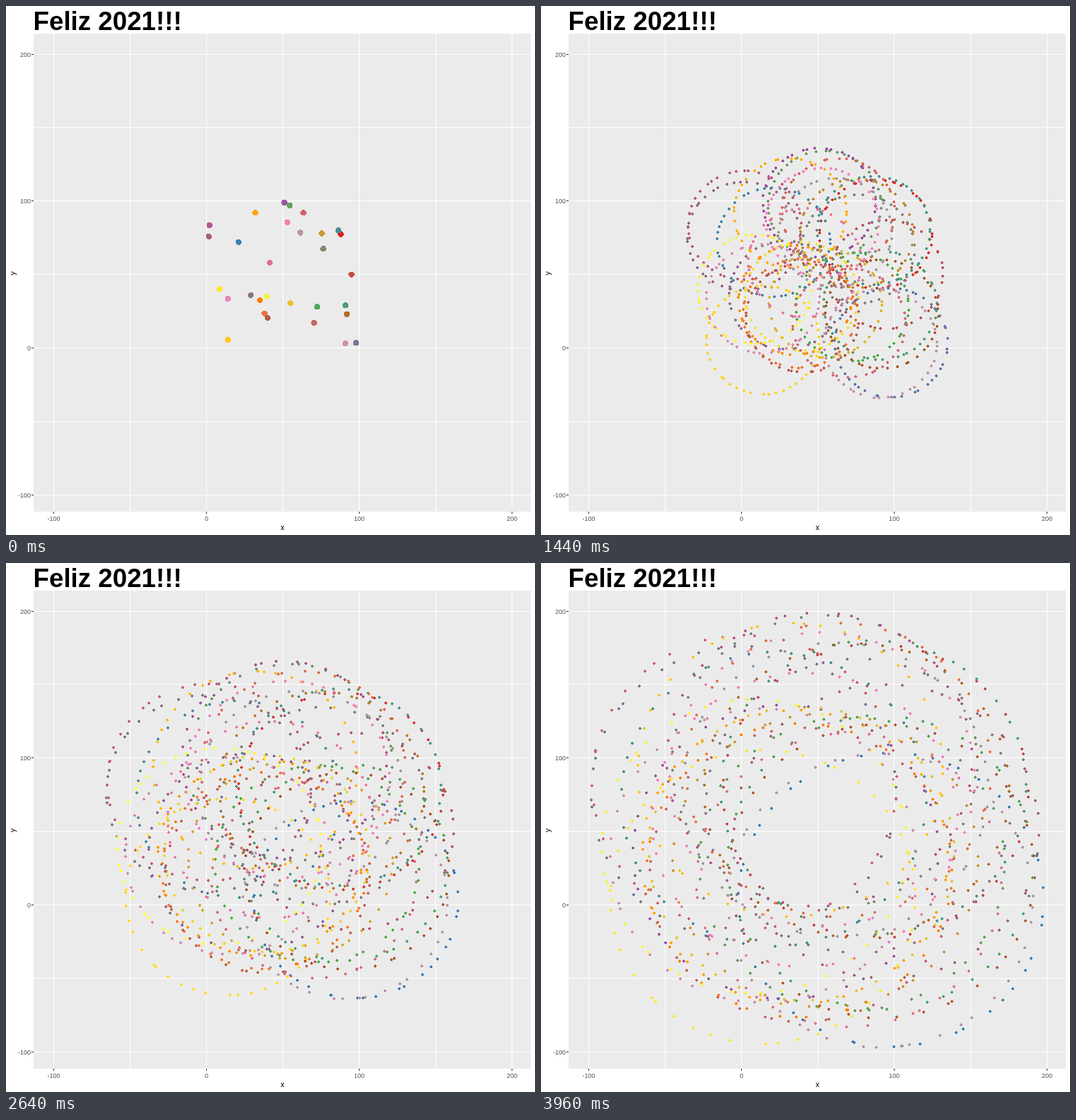
Recreate the animation shown at these times as an HTML page with a canvas. Size 748 by 748 pixels, loop 4000 ms.

```html
<!DOCTYPE html>
<html lang="es">
<head>
<meta charset="utf-8">
<title>Feliz 2021!!!</title>
<style>
  html, body { margin: 0; width: 100%; height: 100%; overflow: hidden; background: #fff; }
  svg, canvas { position: absolute; left: 0; top: 0; width: 100%; height: 100%; }
  text { font-family: "Liberation Sans", Arial, sans-serif; font-size: 11px; }
  .title { font-size: 36.7px; font-weight: bold; }
  .tick { font-size: 9px; fill: #4d4d4d; }
  rect { shape-rendering: crispEdges; }
</style>
</head>
<body>
<svg viewBox="0 0 748 748">
  <text class="title" x="38.6" y="34">Feliz 2021!!!</text>
  <rect x="39" y="39" width="703" height="676" fill="#ebebeb"/>
  <g id="axes"></g>
  <text x="391" y="741" text-anchor="middle">x</text>
  <text transform="translate(13 378) rotate(-90)" text-anchor="middle">y</text>
</svg>
<canvas id="sky" width="748" height="748"></canvas>
<script>
const FRAME_MS = 40, FRAMES = 100, SPARKS = 45;
const toX = x => 283.5 + x * 2.158;
const toY = y => 483.5 - y * 2.077;

const palette = "#e41a1c #377eb8 #4daf4a #984ea3 #ff7f00 #ffff33 #a65628 #f781bf #999999".split(" ");

// Launch points in axis units, in palette order
const centres = [
  [88, 77.5], [95, 50], [1.5, 76], [98, 3.5], [21, 72], [86.5, 80],
  [91, 29], [72.5, 28], [54.5, 97], [76.5, 67.5], [29, 36], [51, 99],
  [2, 83.5], [63.5, 92], [38, 23.5], [35, 32.5], [32, 92], [14, 5.5],
  [8.5, 40], [39.5, 35], [55, 30.5], [75.5, 78], [92, 23], [40, 20.5],
  [70.5, 17], [41.5, 58], [53, 85.5], [14, 33.5], [91, 3], [61.5, 78.5]
];

let seed = 2021;
function random() {
  seed = (seed * 16807) % 2147483647;
  return seed / 2147483647;
}

// Each burst spreads its sparks around the circle with some jitter
const bursts = centres.map(([x, y]) => ({
  x, y,
  angles: Array.from({ length: SPARKS }, (_, k) => (k + random()) / SPARKS * 2 * Math.PI)
}));

// u runs from 0 to 1 over the whole palette
function ramp(u) {
  const pos = u * (palette.length - 1);
  const i = Math.min(Math.floor(pos), palette.length - 2);
  return `color-mix(in lab, ${palette[i]}, ${palette[i + 1]} ${((pos - i) * 100).toFixed(2)}%)`;
}

function drawAxes() {
  const rect = (x, y, w, h, fill) =>
    `<rect x="${x}" y="${y}" width="${w}" height="${h}" fill="${fill}"/>`;
  const label = (x, y, anchor, value) =>
    `<text class="tick" x="${x}" y="${y}" text-anchor="${anchor}">${value}</text>`;
  let markup = "";
  for (let value = -100; value <= 200; value += 50) {
    const x = Math.floor(toX(value)), y = Math.floor(toY(value));
    markup += rect(x, 39, 1, 676, "#fff") + rect(39, y, 703, 1, "#fff");
    if (value % 100) continue;
    markup += rect(x, 715, 1, 3, "#333") + rect(36, y, 3, 1, "#333");
    markup += label(x + 0.5, 728, "middle", value) + label(35, y + 4, "end", value);
  }
  document.getElementById("axes").innerHTML = markup;
}

const ctx = document.getElementById("sky").getContext("2d");

function dot(cx, cy) {
  const x = Math.round(cx), y = Math.round(cy);
  ctx.fillRect(x - 2, y - 1, 4, 2);
  ctx.fillRect(x - 1, y - 2, 2, 4);
}

function draw() {
  const frame = Math.floor(performance.now() / FRAME_MS) % FRAMES;
  const radius = frame + 1;
  ctx.clearRect(0, 0, 748, 748);
  bursts.forEach(({ x, y, angles }, i) => {
    ctx.fillStyle = ramp((i * FRAMES + frame) / (bursts.length * FRAMES - 1));
    for (const a of angles) {
      dot(toX(x + radius * Math.cos(a)), toY(y + radius * Math.sin(a)));
    }
  });
  requestAnimationFrame(draw);
}

drawAxes();
draw();
</script>
</body>
</html>
```
